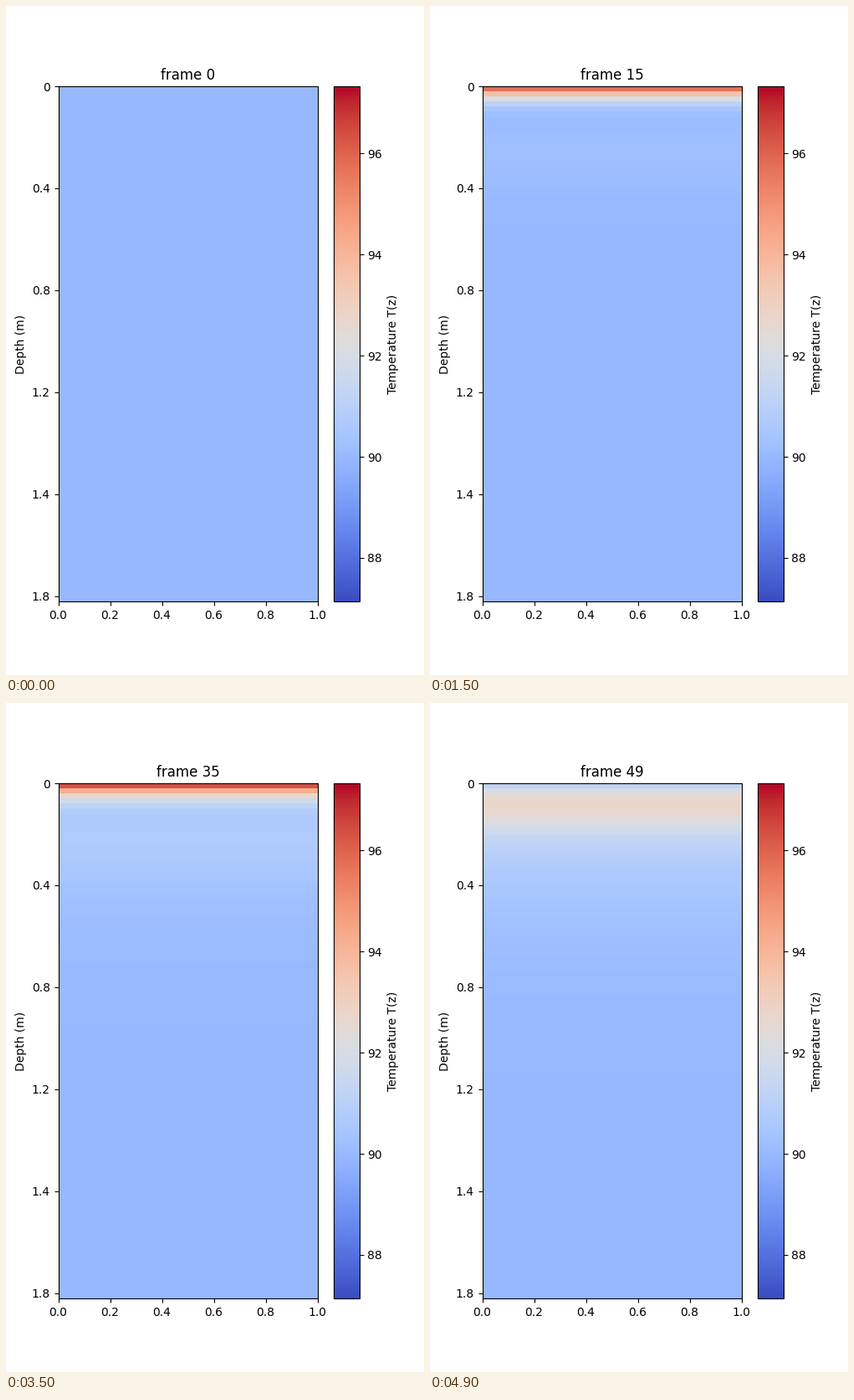
Write a matplotlib script that moves like this. It is 500x800 px and loops after 5000 ms.

```python
import numpy as np
import matplotlib.pyplot as plt
from matplotlib.animation import FuncAnimation

FRAMES, INTERVAL = 50, 100
CELLS = 101
START_TEMP = 90.0

# Heat conduction in cell widths and frames; one day lasts DAY frames.
DIFFUSIVITY = 4.0
DAY, NOON = 10.0, 4.7
SUN, NIGHT_LOSS, FEEDBACK = 15.9, 4.3, 0.066
SUBSTEPS = 50


def surface_flux(time, temp):
    sun = SUN * max(0.0, np.cos(2 * np.pi * (time - NOON) / DAY))
    return sun - NIGHT_LOSS - FEEDBACK * (temp - START_TEMP)


def simulate():
    dt = 1 / SUBSTEPS
    temp = np.full(CELLS, START_TEMP)
    profiles = [temp.copy()]
    for step in range((FRAMES - 1) * SUBSTEPS):
        flux = np.zeros(CELLS + 1)
        flux[0] = surface_flux((step + 0.5) * dt, temp[0])
        flux[1:-1] = -DIFFUSIVITY * np.diff(temp)
        temp -= dt * np.diff(flux)
        if (step + 1) % SUBSTEPS == 0:
            profiles.append(temp.copy())
    return profiles


profiles = simulate()

fig, ax = plt.subplots(figsize=(5, 8), dpi=100)
mesh = ax.pcolormesh([0, 1], np.arange(CELLS + 1), profiles[0][:, None],
                     cmap="coolwarm", vmin=87.14, vmax=97.325)
ax.set_ylim(CELLS, 0)
ax.set_yticks(range(0, CELLS, 20), ["0", "0.4", "0.8", "1.2", "1.4", "1.8"])
ax.set_ylabel("Depth (m)")
title = ax.set_title("frame 0")
fig.colorbar(mesh, ax=ax, label="Temperature T(z)")


def update(frame):
    mesh.set_array(profiles[frame][:, None])
    title.set_text(f"frame {frame}")
    return mesh, title


anim = FuncAnimation(fig, update, frames=FRAMES, interval=INTERVAL,
                     repeat=True, repeat_delay=0)
plt.show()
```
